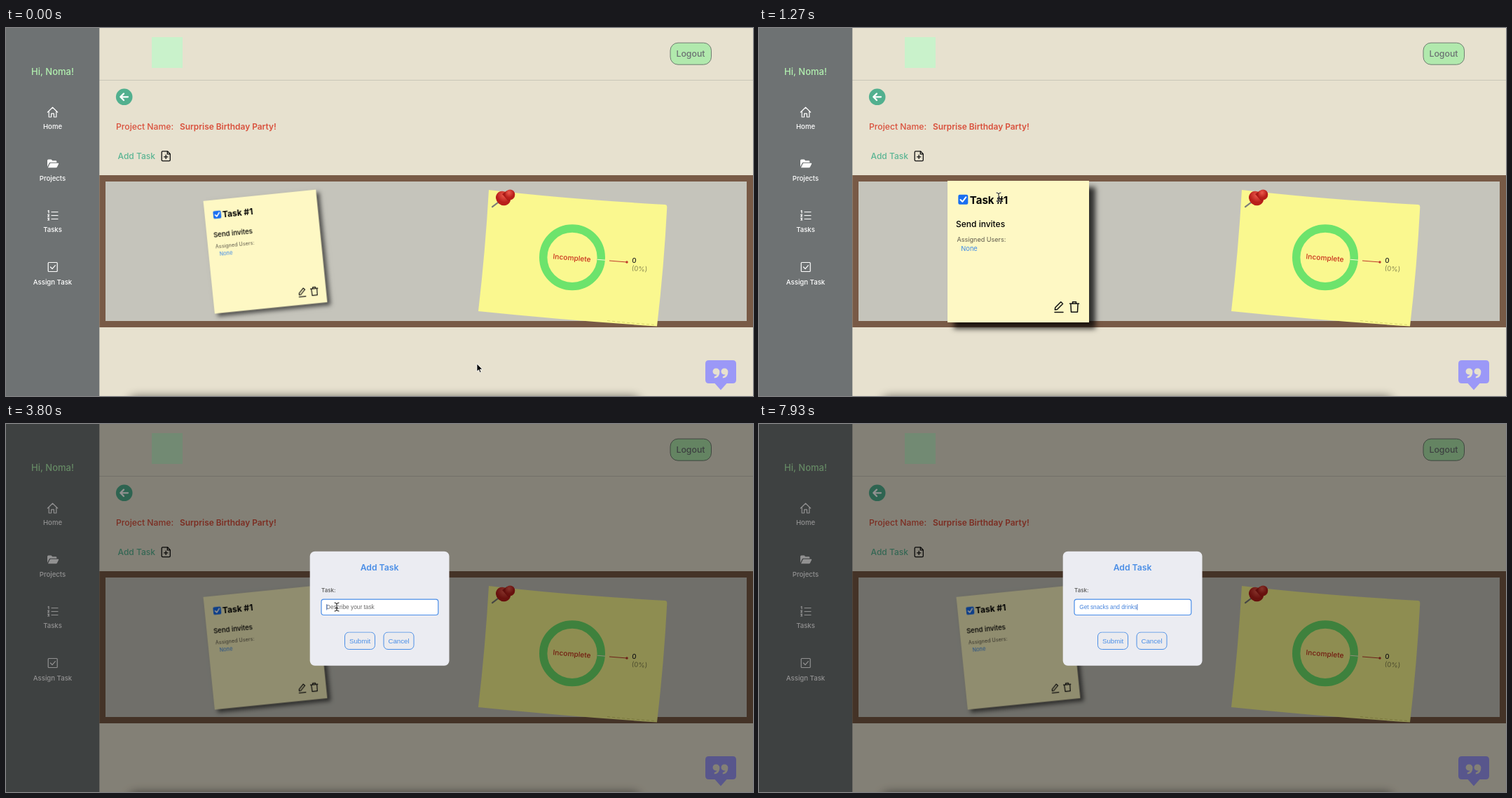
Write an HTML page that moves like this. It is 1066 px wide and 525 px high and loops after 8 s.

```html
<!DOCTYPE html>
<html lang="en">
<head>
<meta charset="utf-8">
<title>Task board</title>
<style>
html, body { margin: 0; width: 100%; height: 100%; overflow: hidden; background: #e7e1cf; }
svg { position: absolute; left: 0; top: 0; overflow: hidden; }
text { font-family: Inter, "Open Sans", sans-serif; white-space: pre; }
.mid { text-anchor: middle; }
.arial { font-family: "Liberation Sans", Arial, sans-serif; }
.line { fill: none; stroke-linecap: round; stroke-linejoin: round; }
.nav { fill: #fff; font-size: 9.6px; font-weight: 500; text-anchor: middle; }

.card {
  position: absolute; left: 269px; top: 218px; width: 202px; height: 202px;
  background: #fef8c4; animation: card 8s linear infinite;
}
.cursor { animation: move 8s ease-in-out infinite; }
.arrow { animation: arrow 8s step-end infinite; }
.beam { animation: beam 8s step-end infinite; }
.hot { animation: hot 8s step-end infinite; }
.modal { animation: modal 8s step-end infinite; }
.panel { animation: panel 8s step-end infinite; }
.field { animation: field 8s step-end infinite; }
.up { animation: up 8s step-end infinite; }
.down { animation: down 8s step-end infinite; }

@keyframes card {
  0%, 7.75%, 21.75%, 100% { transform: rotate(-5.8deg) scale(.8); box-shadow: 5.25px 5.25px 7.3px rgba(33,33,33,.7); }
  9.625%, 19.875% { transform: none; box-shadow: 8.6px 8.6px 7.3px rgba(0,0,0,.75); }
}
@keyframes move {
  0%, 2.5% { transform: translate(672px, 479px); }
  11.6%, 16.9% { transform: translate(342px, 241px); }
  23.75%, 34.1% { transform: translate(230px, 184px); }
  43.75%, 100% { transform: translate(472px, 261px); }
}
@keyframes arrow { 0%, 18% { opacity: 1; } 10%, 40.9%, 100% { opacity: 0; } }
@keyframes beam { 0%, 18%, 74.6%, 100% { opacity: 0; } 10%, 40.9% { opacity: 1; } }
@keyframes hot { 0%, 27.46%, 100% { opacity: 0; } 22.2% { opacity: 1; } }
@keyframes modal { 0% { opacity: 0; } 27.46%, 100% { opacity: 1; } }
@keyframes panel { 0% { y: 182.3px; height: 161px; } 45%, 100% { y: 181.7px; height: 163px; } }
@keyframes field {
  0% { y: 250.5px; width: 166px; height: 21.5px; stroke: #6d6d6d; stroke-width: 1px; }
  45%, 100% { y: 250.2px; width: 166.8px; height: 22.3px; stroke: #4a8ee8; stroke-width: 1.2px; }
}
@keyframes up { 0% { transform: none; } 45%, 100% { transform: translateY(-.7px); } }
@keyframes down { 0% { transform: none; } 45%, 100% { transform: translateY(.5px); } }
</style>
</head>
<body>
<svg width="1066" height="525">
  <defs>
    <filter id="soft" x="-10%" y="-200%" width="120%" height="500%"><feGaussianBlur stdDeviation="7"/></filter>
    <radialGradient id="red" cx=".4" cy=".3"><stop offset="0" stop-color="#ec5a4c"/><stop offset="1" stop-color="#b81f1a"/></radialGradient>
  </defs>
  <rect width="1066" height="525" fill="#e7e1cf"/>
  <rect x="175" y="526" width="730" height="30" rx="10" fill="#000" opacity=".55" filter="url(#soft)"/>
  <path d="M133 74.5H1066" stroke="#c9c6b8"/>
  <rect width="133.3" height="525" fill="#6e7273"/>

  <text class="mid" x="66.5" y="66.5" font-size="13" font-weight="500" fill="#b1efaf">Hi, Noma!</text>
  <g class="line" stroke="#fff" stroke-width="1.2">
    <path d="M59.3 120.2L66.5 113.2L73.7 120.2M61.2 119V127H64.6V122.2H68.4V127H71.8V119"/>
    <path d="M65 262.5H74M65 267.5H74M65 272.5H74M60 261L61 260.3V264M59.6 266.3H61.6L59.8 269H61.6M59.6 271.3H61.6L60.6 272.6L61.6 274H59.6"/>
    <rect x="60.2" y="334.5" width="13" height="13" rx="1"/>
    <path d="M63.5 341L66 343.7L70.3 338.6"/>
  </g>
  <path d="M59 198V189Q59 187.5 60.5 187.5H64.5L66.3 189.2H71Q72.3 189.2 72.3 190.6V191.8H63.2Q62 191.8 61.4 193ZM60 199.3L62.6 193.6Q63 192.8 63.8 192.8H74.5Q75.6 192.8 75 194L72.8 198.5Q72.4 199.3 71.5 199.3Z" fill="#fff"/>
  <text class="nav" x="66.5" y="144">Home</text>
  <text class="nav" x="66.5" y="217.5">Projects</text>
  <text class="nav" x="66.5" y="291">Tasks</text>
  <text class="nav" x="66.5" y="365.5">Assign Task</text>

  <rect x="208" y="13" width="44" height="44" fill="#c9f2cb"/>
  <rect x="948" y="21.2" width="58.5" height="31" rx="11" fill="#b1e9ad" stroke="#6f7c70"/>
  <text class="mid" x="977" y="41.2" font-size="12.3" font-weight="500" fill="#6b7172">Logout</text>

  <circle cx="168.7" cy="98.3" r="11.8" fill="#52b08f"/>
  <path class="line" d="M174 98.3H164M168 93.6L163.3 98.3L168 103" stroke="#fff" stroke-width="2.3"/>
  <text x="157" y="145.2" font-size="12.2" font-weight="500" fill="#d9503c">Project Name:</text>
  <text x="248" y="145.2" font-size="11.9" font-weight="600" fill="#d9503c">Surprise Birthday Party!</text>
  <text x="159.5" y="187.2" font-size="12" font-weight="500" fill="#5cb594">Add Task</text>
  <g class="hot">
    <rect x="151" y="168" width="94.5" height="30" rx="6" fill="#66bc9e"/>
    <text x="159.5" y="187.2" font-size="12" font-weight="500" fill="#f4f3e6">Add Task</text>
  </g>
  <path class="line" d="M223.5 175.8H230.5L234.3 179.6V188.2Q234.3 189.6 233 189.6H223.5Q222.2 189.6 222.2 188.2V177.2Q222.2 175.8 223.5 175.8ZM230.3 176V179.8H234M228.2 181.2V186.4M225.6 183.8H230.8" stroke="#111" stroke-width="1.3"/>

  <rect x="133.3" y="210" width="933" height="217" fill="#785a46"/>
  <rect x="142" y="219" width="915" height="199" fill="#c5c4bb"/>

  <path d="M689 231Q800 244 941 252Q943.500 252.500 943.300 256Q939 340 929 425.500Q800 417 674 404Q684 318 689 231Z" fill="#faf88f"/>
  <path d="M858 417.500Q895 421.500 928 423.500" fill="none" stroke="#d8d56c" stroke-dasharray="4 3"/>
  <circle cx="808" cy="327.300" r="41.300" fill="none" stroke="#6de36c" stroke-width="11.400"/>
  <path d="M843.500 330.200L855 331.200" stroke="#fbfbd8"/>
  <path d="M861 332L886 334" stroke="#c0392b"/>
  <circle cx="886" cy="334" r="1.700" fill="#c0392b"/>
  <text class="mid" transform="translate(807.3 331.5) rotate(4.800)" font-size="10.200" font-weight="500" fill="#c9301c">Incomplete</text>
  <text transform="translate(893 334.800) rotate(4.800)" font-size="9.800" font-weight="500" fill="#222">0</text>
  <text transform="translate(892.500 346) rotate(4.800)" font-size="9.600" fill="#85844f">(0%)</text>
  <path class="line" d="M694 255.200L704 247.500" stroke="#7c7c78" stroke-width="2.200"/>
  <ellipse cx="709.500" cy="243" rx="11" ry="9.800" transform="rotate(40 709.500 243)" fill="url(#red)"/>
  <path d="M708 237L715 232L724 243L717 247Z" fill="#a81a17"/>
  <ellipse cx="719.300" cy="237.800" rx="7" ry="7.400" fill="url(#red)"/>

  <path d="M1003 474H1037Q1042 474 1042 479V502Q1042 507 1037 507H1028.500L1020 516.500L1011.500 507H1003Q998 507 998 502V479Q998 474 1003 474Z" fill="#9b98f7"/>
  <path id="quote" d="M1013.500 485.500A4.500 4.500 0 1 0 1014.600 494.200Q1013.800 496.800 1010.800 497.200V499.500Q1018.400 498.700 1018.400 490.500A4.900 4.900 0 0 0 1013.500 485.500Z" fill="#e7e1cf"/>
  <use href="#quote" x="12"/>
</svg>

<div class="card">
  <svg width="202" height="202">
    <rect x="15.300" y="19.800" width="14" height="14" rx="2.200" fill="#1a6ff0"/>
    <path class="line" d="M18.500 27L21.300 29.800L26.300 23.300" stroke="#fff" stroke-width="2"/>
    <text x="31.800" y="33" font-size="15" font-weight="700">Task #1</text>
    <text x="12" y="66.300" font-size="12" font-weight="500">Send invites</text>
    <text x="13.500" y="86.500" font-size="9.050" fill="#5f5b4c">Assigned Users:</text>
    <text x="19.300" y="100" font-size="9.300" fill="#3c8ae8">None</text>
    <g class="line" stroke="#111" stroke-width="1.500">
      <path d="M153 187.500H165M153.300 184L153.800 180.800L161.800 172.800L164.500 175.500L156.500 183.500Z"/>
      <path d="M174.500 175.300H187.500M178.500 175V172.800H183.500V175M175.900 175.500L176.500 187.300H185.500L186.100 175.500"/>
    </g>
  </svg>
</div>

<svg width="1066" height="525">
  <g class="modal">
    <rect width="1066" height="525" opacity=".43"/>
    <rect class="panel" x="433.700" y="182.300" width="198.800" height="161" rx="7" fill="#ebecf2"/>
    <g class="up">
      <text class="mid" x="533" y="209.500" font-size="12.200" font-weight="600" fill="#4a8ee6">Add Task</text>
      <text x="450" y="241.200" font-size="8" font-weight="500" fill="#555">Task:</text>
    </g>
    <rect class="field" x="450" y="250.500" width="166" height="21.500" rx="3.500" fill="#fff"/>
    <text id="hint" class="arial up" x="457" y="265" font-size="8.300" fill="#6b6b6b">Describe your task</text>
    <text id="typed" class="arial" x="457.300" y="264.200" font-size="8.300" fill="#4583dc"></text>
    <rect id="caret" y="257" width=".9" height="8.500" fill="#3f6fc0"/>
    <g class="down">
      <g fill="#ebebef" stroke="#4a8ee6">
        <rect x="483.500" y="296.500" width="43" height="24.500" rx="6"/>
        <rect x="539" y="296.500" width="43" height="24.500" rx="6"/>
      </g>
      <g class="mid" font-size="9.700" fill="#4a8ee6">
        <text class="arial" x="505" y="312">Submit</text>
        <text class="arial" x="560.500" y="312">Cancel</text>
      </g>
    </g>
  </g>
  <g class="cursor">
    <path class="arrow" d="M0 0V11L2.600 8.700L4.300 12.600L6.100 11.800L4.400 8H7.900Z" fill="#000" stroke="#fff" stroke-width=".8"/>
    <g class="beam line">
      <path d="M-3 -6Q0 -6 0 -4Q0 -6 3 -6M0 -4V4M-3 6Q0 6 0 4Q0 6 3 6M-1.500 1.500H1.500" stroke="#fff" stroke-width="2" opacity=".6"/>
      <path d="M-3 -6Q0 -6 0 -4Q0 -6 3 -6M0 -4V4M-3 6Q0 6 0 4Q0 6 3 6M-1.500 1.500H1.500" stroke="#111"/>
    </g>
  </g>
</svg>

<script>
const LOOP = 8000, FOCUS = 3600, TYPE = 5970, KEY = 98;
const message = "Get snacks and drinks";
const [hint, typed, caret] = ["hint", "typed", "caret"].map(id => document.getElementById(id));

// Put the CSS animations on the same clock as the typing.
document.getAnimations().forEach(a => { a.startTime = 0; });

function draw(now) {
  const t = now % LOOP;
  const count = t < TYPE ? 0 : Math.min(message.length, 1 + Math.floor((t - TYPE) / KEY));
  typed.textContent = message.slice(0, count);
  hint.style.visibility = count ? "hidden" : "visible";
  const lit = count > 0 || (t >= FOCUS && (t - FOCUS) % 1000 < 500);
  caret.style.visibility = lit ? "visible" : "hidden";
  caret.setAttribute("x", 457.3 + (count ? typed.getComputedTextLength() : 0));
  requestAnimationFrame(draw);
}
requestAnimationFrame(draw);
</script>
</body>
</html>
```
